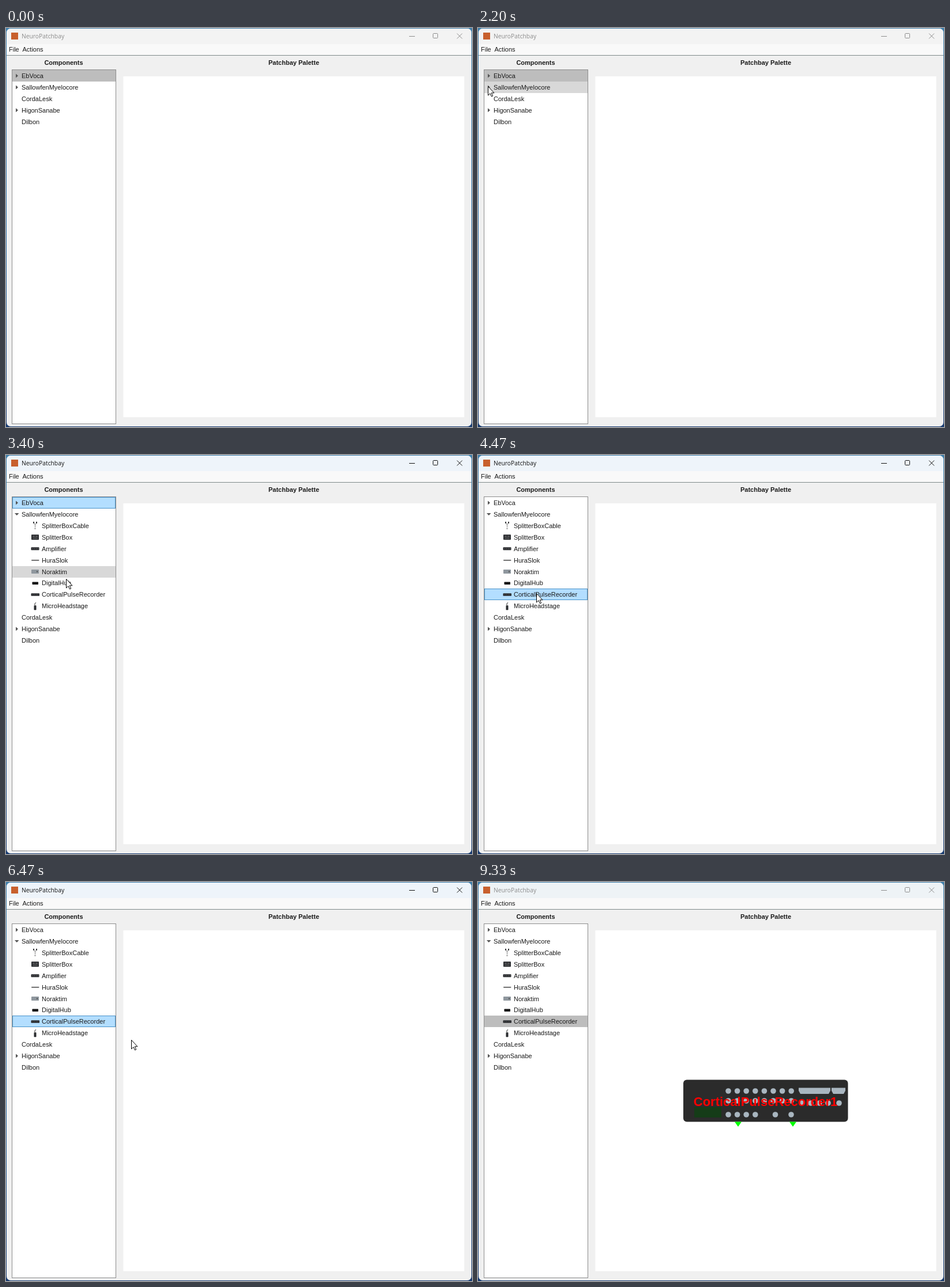
An HTML page that plays this animation: 808 px wide and 693 px high, repeating every 9400 ms.

```html
<!DOCTYPE html>
<html lang="en">
<head>
<meta charset="utf-8">
<title>NeuroPatchbay</title>
<style>
html, body { margin: 0; width: 100%; height: 100%; overflow: hidden; }
svg { display: block; width: 808px; height: 693px; }
text { font: 11px "Liberation Sans", Arial, sans-serif; fill: #1a1a1a; white-space: pre; }
.bold { font-weight: bold; text-anchor: middle; }
#caption { font-family: "Open Sans", sans-serif; font-size: 10.3px; }
#label { font-size: 22px; fill: #f00; }
</style>
</head>
<body>
<svg viewBox="0 0 808 693">
  <defs>
    <linearGradient id="desktop" x2="0" y2="1">
      <stop stop-color="#3f80ad"/><stop offset=".5" stop-color="#2d71ac"/><stop offset="1" stop-color="#173a70"/>
    </linearGradient>
  </defs>
  <rect width="808" height="693" fill="url(#desktop)"/>
  <rect x="1" y="1" width="806" height="691" rx="7" fill="#f0f0f0"/>
  <path id="titlebar" d="M1 28V8a7 7 0 0 1 7-7H800a7 7 0 0 1 7 7V28z"/>
  <rect x="9" y="8" width="12" height="12" fill="#c8602d"/>
  <text id="caption" x="27" y="18">NeuroPatchbay</text>
  <path id="buttons" fill="none" d="M699 14.5h10M782 9.5l9 9m0-9l-9 9M741.5 9.5h6a1 1 0 0 1 1 1v6a1 1 0 0 1-1 1h-6a1 1 0 0 1-1-1v-6a1 1 0 0 1 1-1z"/>
  <rect x="1" y="28" width="806" height="19" fill="#f9f9f9"/>
  <rect x="1" y="47" width="806" height="1" fill="#7f8a8a"/>
  <text x="5" y="41">File</text>
  <text x="28.5" y="41">Actions</text>
  <text class="bold" x="100" y="64">Components</text>
  <text class="bold" x="499" y="64">Patchbay Palette</text>
  <rect x="203.5" y="84" width="591" height="592" fill="#fff"/>
  <rect x="10.5" y="72.5" width="180" height="615" fill="#fff" stroke="#8c8c8c"/>
  <rect id="selection" x="11" width="179" height="20"/>
  <rect id="hover" x="11" width="179" height="20" fill="#d8d8d8"/>
  <g id="roots"></g>
  <g id="children"></g>
  <g id="lowerRoots"></g>
  <g id="device">
    <rect x="356" y="343.5" width="285.5" height="73" rx="6" fill="#2b2b2b"/>
    <g id="ports" fill="#a9b6c0"><path d="M556 357.5h55v5l-3 5.500h-49l-3-5.500zM613 357.500h24v5l-3 5.500h-18l-3-5.500z"/></g>
    <rect x="375" y="391" width="47" height="18" fill="#153c18"/>
    <path d="M445 416.500h12l-6 8.500zM540 416.500h12l-6 8.500z" fill="#0f0"/>
    <text id="label" class="bold" x="498.500" y="389">CorticalPulseRecorder1</text>
  </g>
  <path id="cursor" d="M.5.5V16l3.500-3.300 2.500 5.300 2.200-1-2.400-5.200H11z" fill="#fff" stroke="#000"/>
</svg>
<script>
const $ = id => document.getElementById(id);
const LOOP = 9400, ROW = 19.92, TOP = 73;
const ACTIVATE = 38, EXPAND = 39, SELECT = 67, DROP = 110, DEACTIVATE = 140;
const rowTop = i => TOP + i * ROW;
const add = (parent, markup) => $(parent).insertAdjacentHTML("beforeend", markup);
const set = (id, attrs) => { for (const k in attrs) $(id).setAttribute(k, attrs[k]); };
const show = (id, on) => set(id, { visibility: on ? "visible" : "hidden" });

function addRow(parent, i, x, text, extra = "") {
  const y = rowTop(i);
  add(parent, `<text x="${x}" y="${y + 14}">${text}</text><g transform="translate(0 ${y + 10})">${extra}</g>`);
}

const closed = '<path d="M17 -3.500l4 3.500l-4 3.500z" fill="#555"/>';
addRow("roots", 0, 27, "EbVoca", closed);
addRow("roots", 1, 27, "SallowfenMyelocore", '<path id="twisty" fill="#555"/>');
addRow("lowerRoots", 2, 27, "CordaLesk");
addRow("lowerRoots", 3, 27, "HigonSanabe", closed);
addRow("lowerRoots", 4, 27, "Dilbon");

const box = (x, y, w, h, fill = "#2b2d30") => `<rect x="${x}" y="${y}" width="${w}" height="${h}" rx=".7" fill="${fill}"/>`;
const slots = (y, h) => [46, 49, 52, 55].map(x => box(x, y, 1, h, "#777")).join("");
[
  ["SplitterBoxCable", '<path d="M48 -6l2.500 5l2.500 -5M50.500 -1v4" fill="none" stroke="#888"/>' + box(47, -7, 2, 3) + box(52, -7, 2, 3) + box(49, 4, 3, 2, "#aaa")],
  ["SplitterBox", box(44, -4.500, 13, 9) + box(46, -2, 4, 1, "#888") + box(51, -2, 4, 1, "#888") + box(46, 1, 9, 1, "#777")],
  ["Amplifier", box(43.500, -2.500, 14, 5) + slots(-1, 2)],
  ["HuraSlok", box(44, -.5, 13.500, 1.300, "#444")],
  ["Noraktim", box(44, -3.500, 13, 7, "#8f979e") + box(53, -1, 2, 2, "#444")],
  ["DigitalHub", box(45.500, -2, 10.500, 4.500, "#111")],
  ["CorticalPulseRecorder", box(43.500, -2, 14.500, 4.500) + slots(-.5, 1)],
  ["MicroHeadstage", box(48.500, -1, 4, 8) + '<path d="M50 -1v-3l2 -2" fill="none" stroke="#777" stroke-width="1.500"/>']
].forEach(([name, icon], i) => addRow("children", i + 2, 62, name, icon));

const port = (x, y) => add("ports", `<circle cx="${x}" cy="${y}" r="4.800"/>`);
for (let i = 0; i < 8; i++) {
  const x = 434 + i * 15.600;
  port(x, 363);
  port(x, 380);
  if (i < 4) port(x, 404);
}
port(515.500, 404);
port(543, 404);
[561, 577, 592, 607, 626].forEach(x => port(x, 384));

// Pointer waypoints: [step, x, y], 15 steps per second
const path = [
  [16, 112, 13], [20, 97, 62], [24, 70, 90], [27, 44, 94], [30, 22, 94], [33, 17, 101],
  [39, 17, 101], [41, 27, 112], [45, 60, 150], [51, 104, 215], [52, 105, 222], [54, 104, 233], [57, 101, 239.500],
  [86, 101, 239.500], [88, 109, 243], [91, 148, 256], [95, 208, 272], [97, 217, 274],
  [114, 217, 274], [116, 229, 300], [118, 235, 350], [120, 222, 435], [122, 187, 535], [125, 117, 672]
];

function pointerAt(n) {
  const i = path.findIndex(p => p[0] >= n);
  if (i < 0 || n < path[0][0]) return null;
  const b = path[i], a = path[i - 1] || b;
  const k = b === a ? 0 : (n - a[0]) / (b[0] - a[0]);
  return { x: a[1] + (b[1] - a[1]) * k, y: a[2] + (b[2] - a[2]) * k };
}

function hoveredRow(n, expanded) {
  const p = pointerAt(n - 1);      // highlight trails the pointer by one step
  if (!p || p.x > 190) return -1;
  const row = Math.floor((p.y - TOP) / ROW);
  return row < (expanded ? 13 : 5) ? row : -1;
}

function draw(t) {
  const n = Math.floor(t * 15 / 1000 + .06);
  const active = n >= ACTIVATE && n < DEACTIVATE, expanded = n >= EXPAND;
  const ink = active ? "#111" : "#8c8c8c";
  set("titlebar", { fill: active ? "#eef4fa" : n >= DEACTIVATE ? "#eef3f6" : "#f3f3f3" });
  $("caption").style.fill = ink;
  set("buttons", { stroke: ink });

  show("children", expanded);
  set("lowerRoots", { transform: `translate(0 ${expanded ? 8 * ROW : 0})` });
  set("twisty", { d: expanded ? "M15 -2h7.500l-3.750 4z" : "M17 -3.500l4 3.500l-4 3.500z" });

  const selected = n < SELECT ? 0 : 8, hover = hoveredRow(n, expanded);
  const inset = active ? .5 : 0;
  set("selection", {
    x: 11 + inset, y: Math.round(rowTop(selected)) + inset, width: 179 - 2 * inset, height: 20 - 2 * inset,
    fill: active ? "#b3deff" : "#bdbdbd", stroke: active ? "#4791c9" : "none"
  });
  show("hover", hover >= 0 && !(active && hover === selected));
  set("hover", { y: Math.round(rowTop(Math.max(hover, 0))) });

  show("device", n >= DROP);
  const p = pointerAt(n);
  show("cursor", p);
  if (p) set("cursor", { transform: `translate(${Math.round(p.x)} ${Math.round(p.y)})` });
}

const start = performance.now();
(function tick() {
  draw((performance.now() - start) % LOOP);
  requestAnimationFrame(tick);
})();
</script>
</body>
</html>
```
